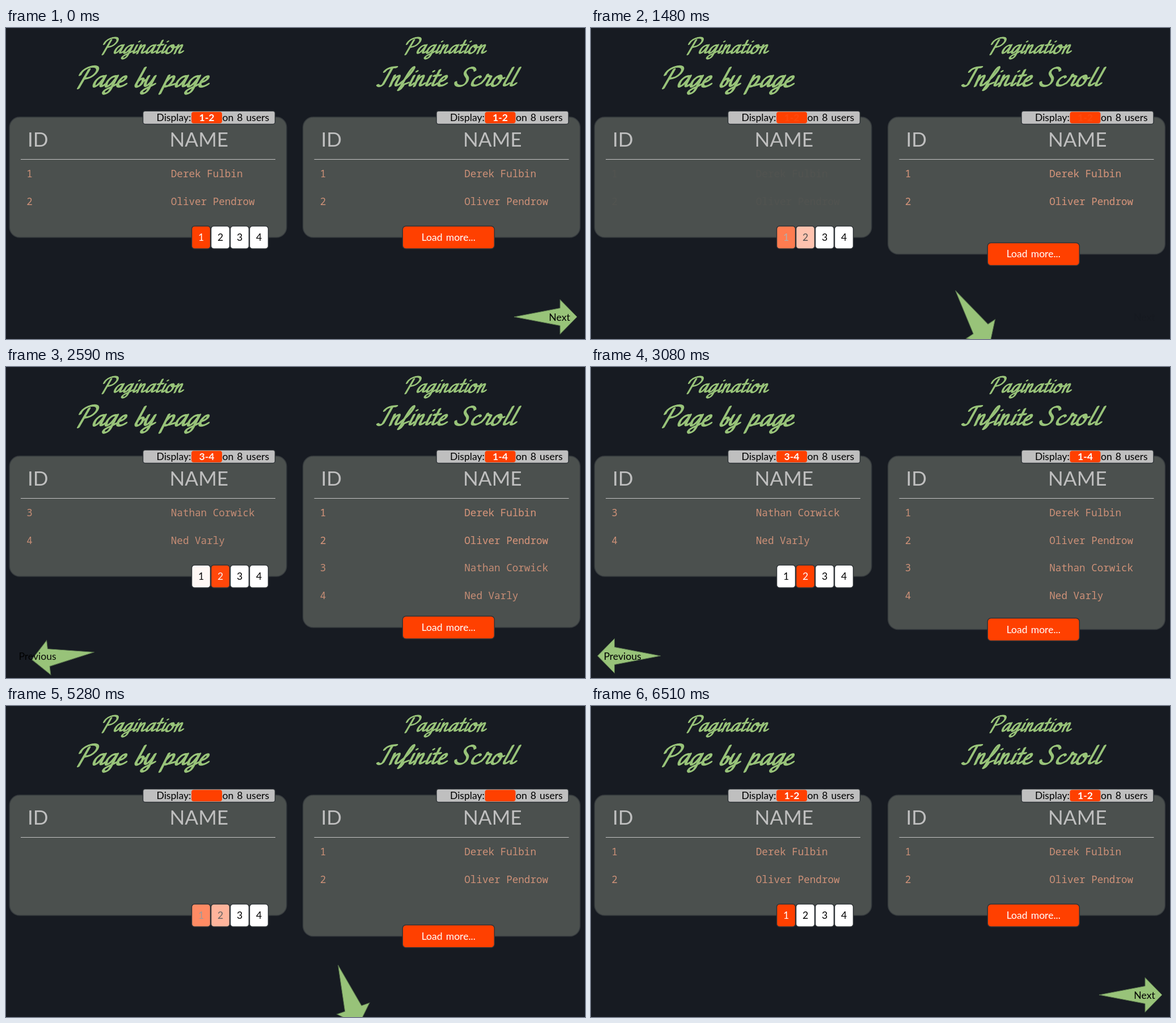
An HTML page for the animation above (7.05 s loop, 1021 by 548 pixels).

```html
<!DOCTYPE html>
<html lang="en">
<head>
<meta charset="utf-8">
<title>Pagination: page by page and infinite scroll</title>
<style>
  html, body { margin: 0; width: 100%; height: 100%; overflow: hidden; background: #171b22; }
  svg { display: block; width: 100%; height: 100%; }
  text { font: 17.6px Lato, sans-serif; word-spacing: 1.5px; }
  .head { font-size: 35.2px; fill: #bfbfbf; }
  .row { font: 17.6px "Noto Sans Mono", monospace; word-spacing: 0; fill: #ce9178; white-space: pre; }
  .range { font-weight: bold; fill: #fff; }
  .mid { text-anchor: middle; }
  .end { text-anchor: end; }
  .panel { fill: #4b504e; stroke: #363b3e; stroke-width: 1.5; }
  .box { stroke: #2e3337; stroke-width: 1.5; }
  .script { fill: none; stroke: #98c379; stroke-width: 5.4; stroke-linecap: round; stroke-linejoin: round; }
</style>
</head>
<body>
<svg id="stage" viewBox="0 0 1021 548" xmlns="http://www.w3.org/2000/svg"></svg>
<script>
const LOOP = 7050;
const FORWARD = { start: 995, step: 69, count: 30 };
const BACK = { start: 4510, step: 75.5, count: 25 };
const ORANGE = [255, 64, 0], WHITE = [255, 255, 255], BLACK = [0, 0, 0];
const USERS = ["Derek Fulbin", "Oliver Pendrow", "Nathan Corwick", "Ned Varly"];
const RIGHT = 517.5;

// Brush lettering: advance width and upright pen strokes, baseline at 0
const GLYPHS = {
  " ": [28, ""],
  P: [56, "M25-58L14 4M2-40C2-62 30-72 46-66C62-58 50-30 24-28"],
  I: [38, "M4-50C8-66 30-65 40-66M26-64L17-6C13 2 5 1-1-4"],
  S: [56, "M53-54C46-70 21-66 21-49C21-36 42-34 40-16C38 4 6 4 2-14"],
  a: [40, "M30-34C18-40 4-26 5-10C6 4 18 2 30-32M31-37L28-10C28 0 34-1 42-10"],
  b: [30, "M14-64L6-8C8 4 23 0 24-18C24-31 15-30 9-20M24-18L31-23"],
  c: [34, "M25-30C23-40 4-30 5-12C6 2 23 0 34-10"],
  e: [32, "M6-16C20-18 26-28 22-34C16-40 4-26 5-11C6 3 22 0 32-10"],
  f: [26, "M0-12C22-34 30-66 23-66C16-66 10-30 6 0L2 13C5 15 12 6 13-6L26-12"],
  g: [38, "M30-34C18-40 4-26 5-10C6 4 18 2 30-32M31-37L26 6C24 24 6 26 6 16C6 8 24 2 40-10"],
  i: [20, "M11-36L8-10C8 0 14 0 20-10M14-51l1-1"],
  l: [24, "M17-64L9-10C9 0 17 0 25-10"],
  n: [38, "M7-37L6 0M6-14C12-30 18-38 23-36C28-34 22-16 23-8C24 0 31-1 38-10"],
  o: [38, "M19-36C7-34 2-18 5-7C9 4 27 0 29-18C30-32 23-38 19-36C17-26 27-24 38-28"],
  p: [40, "M9-38L3 22M8-18C14-32 24-40 28-32C31-20 22 2 10-3M24-5L40-10"],
  r: [36, "M2-10C8-20 12-30 12-40C14-32 25-36 27-33L23-8C24 0 31-2 38-10"],
  t: [24, "M14-56L9-10C9 0 16 0 24-10M2-36L24-38"],
  y: [36, "M7-36C3-14 5-2 12-4C20-8 26-24 28-36L23 8C20 24 4 24 4 16C4 8 24 0 37-10"]
};

const stage = document.getElementById("stage");

function add(tag, attrs, parent = stage, content) {
  const node = document.createElementNS("http://www.w3.org/2000/svg", tag);
  for (const key in attrs) node.setAttribute(key, attrs[key]);
  if (content) node.textContent = content;
  parent.appendChild(node);
  return node;
}

const label = (x, y, content, cls = "", parent = stage) =>
  add("text", { x, y, class: cls }, parent, content);

const box = (x, y, width, height, rx, fill, cls = "box", parent = stage) =>
  add("rect", { x, y, width, height, rx, fill, class: cls }, parent);

function lettering(words, x, y, scale) {
  const group = add("g", {
    class: "script", role: "img", "aria-label": words,
    transform: `translate(${x} ${y}) scale(${scale}) skewX(-22)`
  });
  let pen = 0;
  for (const char of words) {
    const [advance, d] = GLYPHS[char];
    // Slanted nib: thicker downstrokes than upstrokes
    for (const k of [-1, 0, 1]) {
      if (d) add("path", { d, transform: `translate(${pen + k * 1.7} ${-k})` }, group);
    }
    pen += advance;
  }
}

function rows(first, parent) {
  const group = add("g", {}, parent);
  for (const i of [first, first + 1]) {
    const y = 263 + 48.7 * (parent === left ? i % 2 : i);
    label(36.3, y, String(i + 1), "row", group);
    label(290.8, y, USERS[i], "row", group);
  }
  return group;
}

function table(x) {
  const group = add("g", { transform: `translate(${x} 0)` });
  const panel = box(6.2, 157, 488.6, 212, 18, "", "panel", group);
  label(38, 209, "ID", "head", group);
  label(288.5, 209, "NAME", "head", group);
  add("path", { d: "M26 231.5H475", stroke: "#c4c4c4" }, group);
  box(241.5, 146.3, 233, 23.2, 4, "#bfbfbf", "box", group);
  box(327, 147.8, 54, 20.2, 4, "#ff4000", "", group);
  label(326.5, 164, "Display:", "end", group);
  label(381.5, 164, "on 8 users", "", group);
  return { group, panel };
}

lettering("Pagination", 165.5, 45, .412);
lettering("Page by page", 121, 104, .533);
lettering("Pagination", 699.5, 45, .412);
lettering("Infinite Scroll", 655, 102.5, .508);

const leftTable = table(0), rightTable = table(RIGHT);
const left = leftTable.group, right = rightTable.group;

const firstPage = [rows(0, left), label(354, 164, "1-2", "range mid", left), label(354, 164, "1-2", "range mid", right)];
const secondPage = [rows(2, left), rows(2, right), label(354, 164, "3-4", "range mid", left), label(354, 164, "1-4", "range mid", right)];
rows(0, right);
const overlay = rows(0, right);

const pages = [1, 2, 3, 4].map((n, i) => ({
  box: box(327.5 + 34 * i, 349, 33, 40, 5, "#fff", "box", left),
  digit: label(344 + 34 * i, 375, String(n), "mid", left)
}));

const more = add("g", {});
box(699.3, 349, 162, 40, 6, "#ff4000", "box", more);
add("text", { x: 780.3, y: 375, class: "mid", fill: "#fff" }, more, "Load more...");

const arrow = add("path", {
  d: "M-55.5 0L25.5-15.5V-30.5L55.5 0L25.5 30.5V15.5Z",
  fill: "#98c379", stroke: "#55704a", "stroke-width": 1
});
firstPage.push(label(976, 515.5, "Next", "mid"));
secondPage.push(label(55.5, 515.5, "Previous", "mid"));

const clamp = v => Math.min(1, Math.max(0, v));
const mix = (a, b, k) => `rgb(${a.map((v, i) => Math.round(v + (b[i] - v) * k))})`;
const phase = (time, { start, step, count }) => clamp(Math.floor((time - start) / step) / count);
const fade = (nodes, k) => nodes.forEach(node => node.setAttribute("opacity", k));

// Short start, long soft landing
function ease(t) {
  const done = 1.8 * Math.pow(t, 1.314);
  return done / (done + Math.pow(1 - t, 2.057));
}

function paintPage({ box, digit }, active) {
  box.setAttribute("fill", mix(WHITE, ORANGE, active));
  digit.setAttribute("fill", mix(BLACK, WHITE, active));
}

function draw(time) {
  const out = phase(time, FORWARD);
  const p = ease(out) - ease(phase(time, BACK));
  const drop = 93.5 * p;
  rightTable.panel.setAttribute("height", 212 + drop);
  more.setAttribute("transform", `translate(0 ${drop})`);
  arrow.setAttribute("transform", `translate(${951.5 - 884.5 * p} 509) rotate(${180 * p})`);
  paintPage(pages[0], 1 - p);
  paintPage(pages[1], p);
  fade(firstPage, clamp(1 - p / .33));
  fade(secondPage, clamp((p - .66) / .32));
  fade([overlay], out > 0 && out < 1 ? .5 : 0);
}

const began = performance.now();
function tick() {
  draw((performance.now() - began) % LOOP);
  requestAnimationFrame(tick);
}
tick();
</script>
</body>
</html>
```
